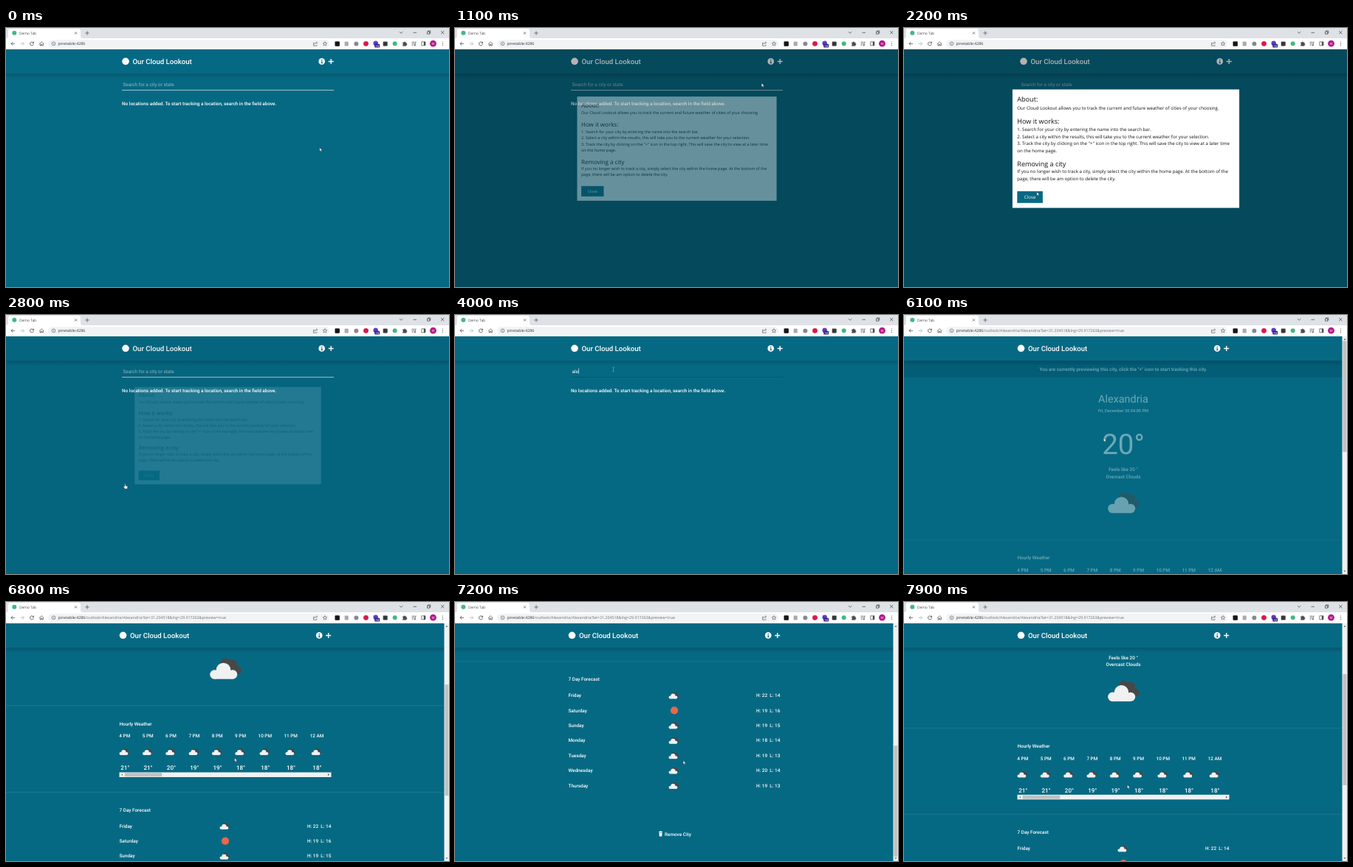
Write an HTML page that moves like this. It is 600 px wide and 352 px high and loops after 8 s.

```html
<!DOCTYPE html>
<html lang="en">
<head>
<meta charset="utf-8">
<title>Weather demo</title>
<style>
  html, body { margin: 0; width: 100%; height: 100%; overflow: hidden; background: #066983; }
  svg { display: block; width: 600px; height: 352px; }
  text { white-space: pre; text-rendering: geometricPrecision; font: 500 6.4px Roboto, sans-serif; fill: #fff; }
  .ui, .modal text { font-family: "Open Sans", "Noto Sans", sans-serif; font-weight: 400; }
  .modal text { font-size: 6.13px; fill: #111; }
  .modal .head { font-size: 9.1px; }
</style>
</head>
<body>
<svg id="stage" viewBox="0 0 600 352" xmlns="http://www.w3.org/2000/svg"></svg>
<script>
const LOOP = 8000;
const PAGE = '#066983', DARK = '#034e66', INK = '#4a4d51';
const APP = 'Our Cloud Lookout';
const HOST = 'pinetable:4286';
const PATH = '/outlook/Alexandria/Alexandria?lat=31.204518&lng=29.917263&preview=true';
const QUERY = 'alexandria egypt';

const stage = document.getElementById('stage');

function el(parent, name, attrs = {}) {
  const node = document.createElementNS('http://www.w3.org/2000/svg', name);
  for (const key in attrs) node.setAttribute(key, attrs[key]);
  return parent.appendChild(node);
}
const group = (parent, attrs) => el(parent, 'g', attrs);
const rect = (parent, x, y, width, height, fill, more) =>
  el(parent, 'rect', { x, y, width, height, fill, ...more });
const circle = (parent, cx, cy, r, fill, more) => el(parent, 'circle', { cx, cy, r, fill, ...more });
const shape = (parent, d, fill, more) => el(parent, 'path', { d, fill, ...more });
const line = (parent, d, stroke, width = 0.8, more) =>
  shape(parent, d, 'none', { stroke, 'stroke-width': width, ...more });
function text(parent, x, y, str, style = '', more) {
  const node = el(parent, 'text', { x, y, style, ...more });
  node.textContent = str;
  return node;
}
const centred = (parent, x, y, str, style = '') => text(parent, x, y, str, 'text-anchor:middle;' + style);
const show = (node, on) => node.setAttribute('display', on ? 'inline' : 'none');
const fade = (node, value) => node.setAttribute('opacity', value);

// ---- weather page -------------------------------------------------------

function cloud(parent, x, y, scale) {
  const g = group(parent, { transform: `translate(${x} ${y}) scale(${scale})` });
  const back = group(g, { fill: '#484848' });
  [[0, -7, 7], [8.5, -5.5, 7], [16, 2, 5.5]].forEach(c => circle(back, ...c, '#484848'));
  rect(back, 0, -4, 16, 11.5, '#484848');
  [[-15, 8, 6.3], [-3, 2, 9.8], [9.5, 8, 6.2]].forEach(c => circle(g, ...c, '#f1f1f1'));
  rect(g, -15, 4, 24.5, 10.2, '#f1f1f1');
}

function buildCity(parent) {
  const g = group(parent);
  rect(g, 0, 62, 593.5, 22.5, DARK);
  centred(g, 297, 75.5, 'You are currently previewing this city, click the "+" icon to start tracking this city.');
  centred(g, 297, 118.5, 'Alexandria', 'font-size:14.4px;font-weight:400');
  centred(g, 297, 132, 'Fri, December 30 04:05 PM', 'font-size:5.6px');
  centred(g, 297, 189, '20°', 'font-size:38.4px;font-weight:400');
  centred(g, 297, 211.9, 'Feels like 20 °');
  centred(g, 297, 221.5, 'Overcast Clouds');
  cloud(g, 297.5, 255, 1);
  [305, 422.6].forEach(y => rect(g, 0, y, 593.5, 0.6, '#fff', { opacity: 0.14 }));

  text(g, 153.5, 332.2, 'Hourly Weather');
  const temps = [21, 21, 20, 19, 19, 18, 18, 18, 18];
  temps.forEach((temp, i) => {
    const x = i < 6 ? 160.8 + i * 31.35 : [350.8, 385.7, 421][i - 6];
    centred(g, x, 348.7, i < 8 ? `${4 + i} PM` : '12 AM');
    cloud(g, x - 0.5, 368, 0.32);
    centred(g, x + 0.4, 392.8, temp + '°', 'font-size:8px');
  });
  rect(g, 153.5, 396, 287, 6.5, '#f1f1f1');
  rect(g, 160.8, 396.8, 50.5, 4.9, '#c1c1c1');
  shape(g, 'M158 398l-1.8 1.3 1.8 1.3z', '#777');
  shape(g, 'M436 398l1.8 1.3-1.8 1.3z', '#333');

  text(g, 153.5, 449.3, '7 Day Forecast');
  [['Friday', 22, 14], ['Saturday', 19, 16], ['Sunday', 19, 15], ['Monday', 18, 14],
   ['Tuesday', 19, 13], ['Wednesday', 20, 14], ['Thursday', 19, 13]].forEach(([day, high, low], i) => {
    const y = 469 + i * 20.4;
    text(g, 153.5, y + 2.2, day);
    if (i === 1) circle(g, 297, y, 5.1, '#e9684c');
    else cloud(g, 296.3, y, 0.32);
    text(g, 440.3, y + 2.2, `H: ${high}  L: ${low}`, 'text-anchor:end');
  });
  shape(g, 'M276 654h5v1h-5zM277.6 653.2h1.8v1h-1.8zM276.4 655.6h4.2l-.4 5h-3.4z', '#fff');
  text(g, 284, 659.5, 'Remove City');
  return g;
}

// ---- home page ----------------------------------------------------------

function buildHome(parent) {
  const g = group(parent);
  const hint = text(g, 158.5, 78.6, 'Search for a city or state', 'font-weight:400;fill:#9db7c1');
  const typed = text(g, 158.5, 78.6, '', 'font-weight:400');
  const caret = rect(g, 158.5, 72.6, 0.6, 7.4, '#fff');
  const rule = rect(g, 157, 84.2, 287, 0.6, '#fff');
  text(g, 157, 105, 'No locations added. To start tracking a location, search in the field above.');

  const list = group(g);
  rect(list, 157, 90, 287, 88.5, '#000', { opacity: 0.1 });
  rect(list, 157, 89, 287, 88, DARK);
  ['Alexandria, Alexandria, Egypt', 'Alexandria, Virginia, United States',
   'Alexandria, Louisiana, United States', 'Alexandria, Minnesota, United States',
   'Alexandria, West Dunbartonshire, Scotland, United Kingdom']
    .forEach((name, i) => text(list, 158.5, 102.3 + i * 16.3, name));
  return { g, hint, typed, caret, rule, list };
}

function buildHeader(parent) {
  const defs = el(parent, 'defs');
  const grad = el(defs, 'linearGradient', { id: 'drop', x2: 0, y2: 1 });
  el(grad, 'stop', { offset: 0, 'stop-opacity': 0.16 });
  el(grad, 'stop', { offset: 1, 'stop-opacity': 0 });
  rect(parent, 0, 29, 600, 33, PAGE);
  rect(parent, 0, 62, 600, 7, 'url(#drop)');
  const g = group(parent);
  circle(g, 162, 45.3, 4.8, '#fff');
  text(g, 171.5, 48.6, APP, 'font-size:9.6px');
  const info = circle(g, 427.7, 45.4, 4.3, '#fff');
  shape(g, 'M427.1 42.7h1.3v1.2h-1.3zM426.7 44.7h1.7v2.4h.6v.8h-2.4v-.8h.7v-1.6h-.6z', PAGE);
  line(g, 'M440.2 42v7M436.7 45.5h7', '#fff', 1.4);
  return { g, info };
}

function buildModal(parent) {
  const outer = group(parent, { class: 'modal' });
  rect(outer, 0, 29, 600, 323, '#000', { opacity: 0.3 });
  const inner = group(outer);
  rect(inner, 146.9, 83.5, 307.2, 161, '#fff');
  const head = (y, str) => text(inner, 153.3, y, str, '', { class: 'head' });
  const body = (y, ...rows) => rows.forEach((row, i) => text(inner, 153.3, y + i * 9.6, row));
  head(99.9, 'About:');
  body(110.9, `${APP} allows you to track the current and future weather of cities of your choosing.`);
  head(129.8, 'How it works:');
  body(139.9, '1. Search for your city by entering the name into the search bar.',
    '2. Select a city within the results, this will take you to the current weather for your selection.',
    '3. Track the city by clicking on the "+" icon in the top right. This will save the city to view at a later time',
    'on the home page.');
  head(187.6, 'Removing a city');
  body(197, 'If you no longer wish to track a city, simply select the city within the home page. At the bottom of the',
    'page, there will be am option to delete the city.');
  rect(inner, 153.3, 221.8, 34.6, 16, PAGE);
  centred(inner, 170.6, 232, 'Close', 'fill:#fff');
  return { outer, inner };
}

// ---- browser frame ------------------------------------------------------

function buildBrowser(parent) {
  rect(parent, 0, 0, 600, 14, '#dee1e6');
  shape(parent, 'M0 14Q3 14 3 11V4Q3 1 6 1H98Q101 1 101 4V11Q101 14 104 14z', '#fff');
  circle(parent, 11.3, 6.8, 3, '#41b883');
  text(parent, 18, 8.7, 'Demo Tab', 'font-size:4.9px;fill:#45484c', { class: 'ui' });
  line(parent, 'M93 5.4l3 3m0-3l-3 3M107.3 6.9h5.4M110 4.2v5.4', INK, 0.7);
  line(parent, 'M533 5l2.2 2.2L537.400 5M551.500 6.300h4.500M589.200 4l4.200 4.200m0-4.200l-4.200 4.200', '#222', 0.6);
  line(parent, 'M570.500 5h3.200v3.200h-3.200zM571.600 5v-1.100h3.200v3.200h-1', '#222', 0.6);

  rect(parent, 0, 14, 600, 15, '#fff');
  rect(parent, 57, 16, 381, 10.800, '#f1f3f4', { rx: 5.400 });
  line(parent, 'M12 21.300H7M9.300 18.900L6.900 21.300L9.300 23.700', INK);
  line(parent, 'M19.500 21.300h5M22.200 18.900l2.400 2.400-2.400 2.400', '#b4b6b9');
  line(parent, 'M36.800 19.600A2.500 2.500 0 1 0 37.500 21.800M37.500 18.600v2h-2', INK);
  line(parent, 'M45.200 21.500L48.200 18.700L51.200 21.500M46.100 21v3h1.400v-1.800h1.400v1.800h1.400v-3', INK, 0.7);
  circle(parent, 64.500, 21.300, 2.400, 'none', { stroke: INK, 'stroke-width': 0.6 });
  line(parent, 'M64.500 21v1.500M64.500 19.800v.6', INK, 0.6);
  const url = text(parent, 70.600, 23.200, '', 'font-size:5.300px;fill:#36383c', { class: 'ui' });
  const host = el(url, 'tspan');
  host.textContent = HOST;
  const path = el(url, 'tspan', { style: 'fill:#6d7176' });

  line(parent, 'M418 20.200h-1.500v4h4.500v-1.500M417.800 22.500q.2-2.600 3.600-2.600M420.200 18.500l1.500 1.400-1.500 1.400', INK, 0.6);
  line(parent, 'M432 18.500l.8 1.900 2 .2-1.500 1.300.5 2-1.800-1.100-1.800 1.100.5-2-1.500-1.300 2-.2z', INK, 0.6);
  rect(parent, 445.500, 18.300, 6.400, 6.400, '#161616', { rx: 1 });
  rect(parent, 458.600, 18.600, 5.200, 5.800, '#a7abb0', { rx: 1 });
  circle(parent, 474.400, 21.400, 3, '#85898e');
  circle(parent, 487.500, 21.300, 3.400, '#d81a4a');
  circle(parent, 500.700, 20.800, 3.200, '#5b3bc4');
  rect(parent, 499.300, 21.800, 6.800, 4.800, '#2b1b86', { rx: 0.8 });
  centred(parent, 502.700, 25.700, '10', 'font-size:4px');
  rect(parent, 510.700, 18.400, 6, 6, '#36383b', { rx: 1 });
  circle(parent, 526.700, 21.300, 3, '#41b883');
  shape(parent, 'M537.200 19.600h1.600a1 1 0 0 1 2 0h1.600v1.600a1 1 0 0 1 0 2v1.400h-5.200v-1.500a1 1 0 0 0 0-1.900z', INK);
  line(parent, 'M549.500 19.200h4M549.500 21.200h4M549.500 23.200h2.300M554.300 23.300v-4.200h1.500', INK, 0.7);
  circle(parent, 553.700, 23.400, 0.900, INK);
  line(parent, 'M562.800 18.800h5.200v5h-5.200z', INK, 0.700);
  rect(parent, 565.800, 18.800, 2.200, 5, INK);
  circle(parent, 578.500, 21.200, 4.400, '#b5178c');
  centred(parent, 578.500, 23, 'H', 'font-size:4.800px;font-weight:400');
  [19, 21.300, 23.600].forEach(y => circle(parent, 591.500, y, 0.600, INK));
  return path;
}

function buildScrollbar(parent) {
  const g = group(parent);
  rect(g, 593.5, 29, 6.5, 323, '#f1f1f1');
  shape(g, 'M595.500 33.700l1.500-1.800 1.500 1.800z', '#555');
  shape(g, 'M595.500 347.500l1.500 1.800 1.500-1.800z', '#555');
  const thumb = rect(g, 594.4, 35.2, 4.9, 151, '#c1c1c1');
  return { g, thumb };
}

function buildCursors(parent) {
  const edge = { stroke: '#123', 'stroke-width': 0.4 };
  const arrow = group(parent), hand = group(parent), beam = group(parent);
  shape(arrow, 'M0 0V4.900L1.200 3.900L2 5.700L2.900 5.300L2.100 3.600H3.600z', '#fff', edge);
  shape(hand, 'M-1.400-3.300q.7-.7 1.200 0v2.300l2.300.5q.8.300.6 1.200l-.5 2.600h-3.200l-2-2.700q-.1-.8.700-.6l.9.600z', '#fff', edge);
  line(beam, 'M-1-2.900h2M0-2.900v5.800M-1 2.900h2', '#d4a797', 0.5);
  return { arrow, hand, beam };
}

// ---- motion -------------------------------------------------------------

const clamp = v => Math.min(1, Math.max(0, v));
const smooth = v => v * v * (3 - 2 * v);
const linear = v => v;

function swoop(x) {
  if (x <= 0 || x >= 1) return clamp(x);
  const curve = (u, a, b) => 3 * u * (1 - u) ** 2 * a + 3 * u * u * (1 - u) * b + u ** 3;
  let lo = 0, hi = 1;
  for (let i = 0; i < 24; i++) {
    const mid = (lo + hi) / 2;
    if (curve(mid, 0.52, 0.19) < x) lo = mid; else hi = mid;
  }
  return curve(lo, 0.02, 1.02);
}

function track(steps, t, ease) {
  const next = steps.findIndex(s => s[0] > t);
  if (next < 0) return steps[steps.length - 1].slice(1);
  if (next === 0) return steps[0].slice(1);
  const a = steps[next - 1], b = steps[next];
  const k = ease((t - a[0]) / (b[0] - a[0]));
  return a.slice(1).map((v, i) => v + (b[i + 1] - v) * k);
}

const POINTER = [
  [0, 424.7, 162.6], [150, 424.7, 162.6], [650, 428, 46], [930, 428, 46], [1100, 415.2, 75],
  [1500, 370, 130], [2350, 163, 231], [2800, 162, 233], [2880, 163, 230], [3400, 215, 74],
  [4000, 214.5, 74], [4700, 214.5, 74], [5200, 226, 77], [5310, 226, 77], [5520, 212, 100],
  [5700, 212, 101], [6400, 308, 210], [6800, 309.5, 212], [7300, 309, 216], [7900, 302.4, 248.6], [8000, 302, 249]
];
const KINDS = [[0, 'arrow'], [600, 'hand'], [930, 'arrow'], [2300, 'hand'], [2890, 'arrow'],
  [3320, 'beam'], [5420, 'hand'], [5620, 'arrow']];
const SCROLL = [[0, 0], [6480, 0], [6800, 164], [7150, 342], [7520, 342], [7900, 134.6], [8000, 84]];

const page = group(stage);
rect(page, 0, 29, 600, 323, PAGE);
const city = buildCity(page);
const home = buildHome(page);
const header = buildHeader(page);
const bar = buildScrollbar(stage);
const modal = buildModal(stage);
const urlPath = buildBrowser(group(stage));
const cursors = buildCursors(stage);

function draw(t) {
  // Search field
  const count = Math.max(0, Math.min(QUERY.length, Math.floor((t - 3760) / 90) + 1));
  const focus = t >= 3500;
  home.typed.textContent = QUERY.slice(0, count);
  show(home.hint, count === 0);
  show(home.caret, focus);
  home.caret.setAttribute('x', 158.7 + (count ? home.typed.getComputedTextLength() : 0));
  home.rule.setAttribute('fill', focus ? DARK : '#fff');
  show(home.list, t >= 5200);
  fade(home.g, 1 - clamp((t - 5620) / 200));

  // About dialog
  const leave = swoop((t - 2690) / 180);
  const enter = swoop((t - 995) / 300);
  const size = (0.8 + 0.2 * enter) * (1 - 0.2 * leave);
  fade(modal.outer, swoop((t - 845) / 300) * (1 - leave));
  fade(modal.inner, enter);
  modal.inner.setAttribute('transform', `translate(300.5 164) scale(${size}) translate(-300.5 -164)`);

  // City page
  const loaded = t >= 5900;
  const [scroll] = track(SCROLL, t, linear);
  urlPath.textContent = t >= 5620 ? PATH : '';
  show(city, loaded);
  fade(city, smooth(clamp((t - 5900) / 450)));
  city.setAttribute('transform', `translate(0 ${-scroll})`);
  show(bar.g, loaded);
  bar.thumb.setAttribute('y', 35.2 + scroll * 0.468);
  header.g.setAttribute('transform', `translate(${loaded ? -3.5 : 0} 0)`);
  header.info.setAttribute('fill', t >= 620 && t < 900 ? DARK : '#fff');

  // Pointer
  const [x, y] = track(POINTER, t, smooth);
  const kind = KINDS.filter(k => k[0] <= t).pop()[1];
  for (const name in cursors) {
    show(cursors[name], name === kind);
    cursors[name].setAttribute('transform', `translate(${x} ${y})`);
  }
}

function tick() {
  draw(performance.now() % LOOP);
  requestAnimationFrame(tick);
}
tick();
</script>
</body>
</html>
```
